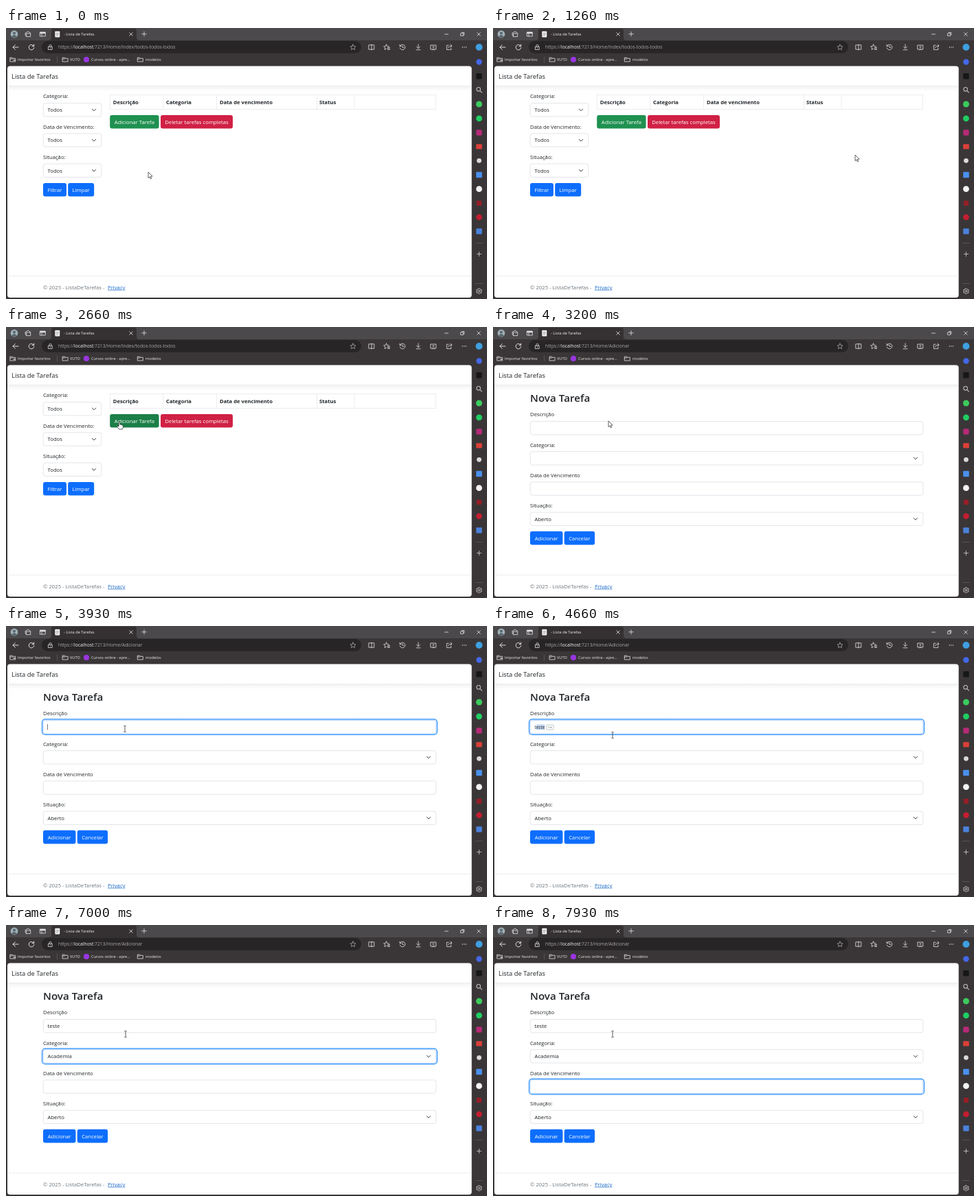
Write an HTML page that moves like this. It is 700x395 px and loops after 8000 ms.

```html
<!DOCTYPE html>
<html lang="pt">
<head>
<meta charset="utf-8">
<title>Lista de Tarefas</title>
<style>
  html, body { margin: 0; width: 100%; height: 100%; overflow: hidden; background: #3a3638; }
  svg { display: block; width: 100vw; height: 100vh; }
  text { font-family: "Open Sans", "Noto Sans", sans-serif; white-space: pre; }
</style>
</head>
<body>
<svg id="stage" viewBox="0 0 700 395" preserveAspectRatio="none">
  <defs>
    <linearGradient id="shade" x1="0" y1="0" x2="0" y2="1">
      <stop offset="0" stop-color="#000" stop-opacity=".055"/>
      <stop offset="1" stop-color="#000" stop-opacity="0"/>
    </linearGradient>
  </defs>
  <g id="chrome"></g>
  <text y="30.4" font-size="6.75" fill="#a9a6a8"><tspan x="76">https://</tspan><tspan fill="#f2f2f2">localhost</tspan><tspan id="path"></tspan></text>
  <g id="frame"></g>
  <g id="list"></g>
  <g id="form"></g>
  <g id="cursor"></g>
</svg>
<script>
const LOOP = 8000, OPEN_FORM = 2950;
const BODY = 7.72, INK = '#212529', LINE = '#dee2e6', BLUE = '#0d6efd';
const $ = id => document.getElementById(id);

const text = (x, y, s, size = BODY, fill = INK, more = '') =>
  `<text x="${x}" y="${y}" font-size="${size}" fill="${fill}" ${more}>${s}</text>`;
const rect = (x, y, w, h, fill, rx = 0, more = '') =>
  `<rect x="${x}" y="${y}" width="${w}" height="${h}" rx="${rx}" fill="${fill}" ${more}/>`;
const dot = (x, y, r, fill) => `<circle cx="${x}" cy="${y}" r="${r}" fill="${fill}"/>`;
const icon = (x, y, d, color = '#e6e4e5', w = .8) =>
  `<path transform="translate(${x} ${y})" d="${d}" fill="none" stroke="${color}" stroke-width="${w}" stroke-linecap="round" stroke-linejoin="round"/>`;
const button = (x, y, w, label, fill, id = '') =>
  rect(x, y, w, 19.6, fill, 3, id && `id="${id}"`) +
  text(x + w / 2, y + 12.7, label, BODY, '#fff', 'text-anchor="middle"');
const chevron = (x, y) => icon(x, y, 'M-2.6-1.3L0 1.3L2.6-1.3', '#343a40', 1);

const CROSS = 'M-2.3-2.3L2.3 2.3M2.3-2.3L-2.3 2.3';
const PLUS = 'M-3.2 0H3.2M0-3.2V3.2';
const FOLDER = 'M-3.8-2.8H-1L0-1.7H3.8V3H-3.8ZM-3.8-.9H-1L0-1.7';
const STAR = 'M0-4L1.2-1.4L4-1.1L1.9.8L2.5 3.6L0 2.2L-2.5 3.6L-1.9.8L-4-1.1L-1.2-1.4Z';
const BOX = 'M-3.8-3H3.8V3H-3.8Z';

function drawChrome() {
  const strip = rect(0, 0, 700, 18, '#4b494b') +
    '<path d="M62 18Q66 18 66 14V4Q66 1 69 1H187Q190 1 190 4V14Q190 18 194 18Z" fill="#353133"/>' +
    dot(12, 9, 5.4, '#9fb0b8') + dot(12, 7.4, 2, '#59666c') +
    '<path d="M8.2 12.6Q12 7.6 15.8 12.6Q12 16 8.2 12.6" fill="#59666c"/>' +
    icon(32, 9, 'M-3.8-1.5L0-4L3.8-1.5M-2-1H3.7V3.6H-2ZM-3.8-1.5V2L-2 3.4') +
    icon(53.5, 9, BOX + 'M-3.8-1.2H3.8M-1.5-1.2V3') + rect(49.7, 6, 7.6, 1.8, '#e6e4e5') +
    rect(71.3, 4.8, 7, 8.6, '#f4f4f4', .8) + icon(74.8, 9.2, 'M-1.8-1.8H1.8M-1.8 0H1.8M-1.8 1.8H1', '#77777a', .6) +
    text(84, 11.1, '- Lista de Tarefas', 5.72, '#f1f1f1') +
    icon(182, 9, CROSS) + icon(201, 8.7, PLUS) +
    icon(641, 9, 'M-2.5 0H2.5') + icon(664.3, 9, 'M-2.3-1.2H1.3V2.4H-2.3ZM-1-2.4H2.5V1.2') + icon(688, 9, CROSS);

  const toolbar = rect(52, 18.8, 465, 18, '#282527', 9) +
    icon(14, 28, 'M4 0H-4M-.6-3.4L-4 0L-.6 3.4', '#f0f0f0', .9) +
    icon(37, 28, 'M3.4-1.6A3.8 3.8 0 1 0 3.8.6M3.7-4V-1.4H1.1', '#f0f0f0', .9) +
    icon(64.5, 28.2, 'M-2.7-.9H2.7V3.3H-2.7ZM-1.5-.9V-2.3A1.5 1.5 0 0 1 1.5-2.3V-.9M0 .9V1.3') +
    icon(505, 28, STAR, '#b9b6b8', .7) +
    icon(532, 28, 'M-3.8-3.2H3.8V3.2H-3.8ZM0-4V4') +
    icon(554, 28, 'M-.5-4L.6-1.4L3.4-1.1M-.5-4L-1.6-1.4L-4.4-1.1L-2.3.8L-2.9 3.6L-.8 2.4M1.6.6H4.4M.8 2H4.4M1.6 3.4H4.4') +
    icon(577, 28, 'M-3.6-1.6A3.9 3.9 0 1 1-3.8 1M-4-3.8V-1.5H-1.7M0-2V.4H1.9') +
    icon(600, 28, 'M0-4.2V1.6M-2.5-.8L0 1.7L2.5-.8M-3 3.8H3') +
    icon(622, 28, BOX + 'M-1.6 4.2L0 2.4L1.6 4.2M-1-1.4L1 .6M1-1.4L-1 .6') +
    icon(645, 28, 'M-.8-2.8H-3.6V3.6H2.8V1.2M-1.4.9Q-.8-2 3.8-2M2-4L4-2L2 0') +
    [-2.6, 0, 2.6].map(d => dot(667 + d, 28, .65, '#eee')).join('') +
    dot(688.5, 28, 5, '#3f9fe0');

  const bookmarks =
    icon(10, 46, FOLDER + 'M.5 1H3M2 .1L3 1L2 1.9') + text(17, 48.2, 'Importar favoritos', 5.6, '#ececec') +
    rect(74, 41.5, .6, 9, '#6a6668') +
    icon(86.3, 46, FOLDER) + text(93, 48.2, 'VUTO', 5.6, '#ececec') +
    dot(117, 46, 4.1, '#9a35e0') + text(124, 48.2, 'Cursos online - apre...', 5.6, '#ececec') +
    icon(195.5, 46, FOLDER) + text(203, 48.2, 'modelos', 5.6, '#ececec');

  const X = 688.5;
  const sidebar =
    dot(X, 49.5, 4.2, '#4468e8') + rect(X - 4.2, 66, 8.4, 8.4, '#171717', 1) +
    icon(X, 90.3, 'M1.4 1.2L4 3.8M2-1A2.8 2.8 0 1 1-3.6-1A2.8 2.8 0 1 1 2-1', '#bcb9bd', 1.1) +
    dot(X, 111, 4.5, '#3ccb5c') + dot(X, 131.8, 4.4, '#1fcf62') +
    rect(X - 4.2, 148.3, 8.4, 8.4, '#b52a76', 2) + rect(X - 4.3, 169.2, 8.6, 7.2, '#dc4038', 1) +
    dot(X, 193.3, 3.4, '#d9d9d9') + rect(X - 4.3, 209.7, 8.6, 8.6, '#4a90ee', 1) +
    dot(X, 234.7, 4.4, '#f3f3f3') + rect(X - 3.6, 251.8, 7.2, 7.2, '#951f26', 1) +
    dot(X, 275.7, 4.3, '#c51d30') + rect(X - 4.2, 292.2, 8.4, 8.4, '#4a82dc', 1) +
    rect(683, 313, 11, .6, '#686466') + icon(X, 329.5, PLUS, '#d0ced0') +
    rect(683, 372, 11, .6, '#686466') +
    icon(X, 383.6, 'M0-4.2L1.3-2.9L3.6-2.1L3.3 0L3.6 2.1L1.3 2.9L0 4.2L-1.3 2.9L-3.6 2.1L-3.3 0L-3.6-2.1L-1.3-2.9Z') +
    icon(X, 383.6, 'M1.3 0A1.3 1.3 0 1 1-1.3 0A1.3 1.3 0 1 1 1.3 0');

  $('chrome').innerHTML = rect(0, 0, 700, 395, '#3a3638') + strip + toolbar + bookmarks + sidebar;
}

function drawFrame() {
  $('frame').innerHTML = rect(2, 55.5, 675.7, 337.5, '#fff', 4) +
    rect(2, 84.2, 675.7, 8, 'url(#shade)') + rect(2, 84, 675.7, .5, LINE) +
    text(8, 74, 'Lista de Tarefas', 9.45) +
    rect(2, 361.4, 675.7, .6, LINE) +
    text(54, 380.6, '© 2025 - ListaDeTarefas -', BODY, '#6c757d') +
    text(148, 380.6, 'Privacy', BODY, '#1768c9', 'text-decoration="underline"');
}

function drawList() {
  const filters = ['Categoria:', 'Data de Vencimento:', 'Situação:'].map((label, i) => {
    const y = 109.4 + 44.2 * i;
    return text(54, y - 7, label) +
      rect(54.2, y + .2, 84.6, 19.4, '#fff', 3, 'stroke="#ced4da" stroke-width=".6"') +
      text(60.5, y + 12.8, 'Todos') + chevron(128, y + 10);
  }).join('');
  const lines = [151.3, 228.5, 306.5, 452.5, 507, 625.7].map(x => rect(x - .3, 97.2, .6, 21.6, LINE)).join('');
  const heads = [[155.8, 'Descrição'], [233, 'Categoria'], [311, 'Data de vencimento'], [456, 'Status']]
    .map(([x, s]) => text(x, 111, s, 7.67, INK, 'font-weight="700"')).join('');
  $('list').innerHTML = filters +
    button(54, 225.9, 34, 'Filtrar', BLUE) + button(90.2, 225.9, 38, 'Limpar', BLUE) +
    lines + rect(151, 97, 475, .6, LINE) + rect(151, 118.4, 475, .6, LINE) + heads +
    button(151.2, 127, 71.4, 'Adicionar Tarefa', '#1f9150', 'add') +
    button(225, 127, 105, 'Deletar tarefas completas', '#d02145');
}

const fieldY = i => 137.3 + 44.2 * i;

function drawForm() {
  const fields = ['Descrição', 'Categoria:', 'Data de Vencimento', 'Situação:'].map((label, i) => {
    const y = fieldY(i);
    return text(54, y - 7, label) +
      `<rect id="ring${i}" fill="#258cfb"/><rect id="gap${i}" fill="#fff"/>` +
      rect(54.2, y + .2, 571.6, 19.4, '#fff', 3, `id="box${i}" stroke-width=".6"`) +
      text(60.5, y + 12.8, i == 3 ? 'Aberto' : '', BODY, INK, `id="value${i}"`) +
      (i % 2 ? chevron(615, y + 10) : '');
  }).join('');
  const hint = rect(63, 143.4, 12.4, 8, '#c5d9f2') + text(60.5, 149.8, 'teste', 6.4) +
    rect(77.7, 144.2, 10.4, 7, '#fff', 1.2, 'stroke="#8b8f94" stroke-width=".5"') +
    text(82.9, 149.3, 'Tab', 4.1, '#777b80', 'text-anchor="middle"');
  $('form').innerHTML = text(54, 109.4, 'Nova Tarefa', 15.2, INK, 'font-weight="600"') + fields +
    `<g id="hint">${hint}</g>` + rect(0, 0, .6, 8.4, '#222', 0, 'id="caret"') +
    button(54, 297.8, 47.5, 'Adicionar', BLUE) + button(103.7, 297.8, 44.4, 'Cancelar', BLUE);
}

const SHAPES = {
  arrow: '<path d="M0 0V8.6L2 6.8L3.4 9.9L4.7 9.3L3.4 6.3L6.1 6.1Z" fill="#fff" stroke="#222" stroke-width=".7" stroke-linejoin="round"/>',
  hand: '<path d="M-.9.8Q0-.6.9.8V4.2Q2 3.6 2.6 4.6Q3.8 4.2 4.2 5.2Q5.4 5 5.5 6.2Q5.6 9 4.2 11H-.4Q-2-.0 9 -3.6 7Q-3.2 5.4-.9 7Z" fill="#fff"/>',
  beam: '<path d="M-1.7-4.4H-.5L0-4L.5-4.4H1.7M0-4V4M-1.7 4.4H-.5L0 4L.5 4.4H1.7" fill="none" stroke="#333" stroke-width=".8"/>'
};
SHAPES.hand = '<path d="M-.9.8Q0-.6.9.8V4.2Q2 3.6 2.6 4.6Q3.8 4.2 4.2 5.2Q5.4 5 5.5 6.2Q5.6 9 4.2 11H-.4Q-2 9-3.6 7Q-3.2 5.4-.9 7Z" fill="#fff" stroke="#222" stroke-width=".7" stroke-linejoin="round"/>';

const clamp = v => Math.max(0, Math.min(1, v));
const ease = v => { v = clamp(v); return v * v * (3 - 2 * v); };

// time, x, y
const TRACK = [[0, 207, 210], [150, 207, 210], [1050, 527, 185], [1500, 527, 185], [2400, 165, 138],
  [2900, 165, 138], [3150, 168, 137], [3300, 168, 137], [3600, 173, 150], [3950, 173, 150], [4300, 174, 159], [LOOP, 174, 159]];

function cursorAt(t) {
  const i = TRACK.findIndex(p => p[0] > t);
  const [t0, x0, y0] = TRACK[i - 1], [t1, x1, y1] = TRACK[i];
  const k = ease((t - t0) / (t1 - t0));
  return [x0 + (x1 - x0) * k, y0 + (y1 - y0) * k];
}

// focus start and end of the first three fields
const FOCUS = [[3750, 5790], [5790, 7430], [7430, 9e3]];

function outset(el, y, d, alpha) {
  const a = { x: 54 - d, y: y - d, width: 572 + 2 * d, height: 19.7 + 2 * d, rx: 3 + d, opacity: alpha };
  for (const k in a) el.setAttribute(k, a[k]);
}

function setFocus(i, k) {
  const mix = (a, b) => Math.round(a + (b - a) * k);
  outset($('ring' + i), fieldY(i), 2.05 * k, k);
  outset($('gap' + i), fieldY(i), .82 * k, k);
  $('box' + i).setAttribute('stroke', `rgb(${mix(206, 134)},${mix(212, 183)},${mix(218, 254)})`);
}

const show = (id, on) => $(id).setAttribute('display', on ? 'inline' : 'none');

function render(t) {
  const form = t >= OPEN_FORM;
  show('list', !form);
  show('form', form);
  $('path').textContent = ':7213/Home/' + (form ? 'Adicionar' : 'Index/todos-todos-todos');

  const [x, y] = cursorAt(t);
  const overAdd = !form && x > 151 && x < 222.5 && y > 127 && y < 146.6;
  $('add').setAttribute('fill', overAdd ? '#1b7f47' : '#1f9150');
  $('cursor').innerHTML = SHAPES[overAdd ? 'hand' : t > 3400 ? 'beam' : 'arrow'];
  $('cursor').setAttribute('transform', `translate(${x} ${y})`);

  FOCUS.forEach(([on, off], i) => setFocus(i, ease((t - on) / 150) - ease((t - off) / 150)));
  setFocus(3, 0);
  const accepted = t >= 5100;
  show('hint', t >= 4450 && !accepted);
  $('value0').textContent = accepted ? 'teste' : '';
  $('value1').textContent = t >= 6700 ? 'Academia' : '';

  const field = FOCUS.findIndex(([on, off]) => t >= on && t < off);
  const typing = t >= 4450 && !accepted;
  const lit = field >= 0 && field != 1 && !typing && (t - FOCUS[field][0]) % 1000 < 500;
  show('caret', lit);
  if (lit) {
    $('caret').setAttribute('x', field == 0 && accepted ? 78.6 : 60.4);
    $('caret').setAttribute('y', fieldY(field) + 5.7);
  }
}

drawChrome();
drawFrame();
drawList();
drawForm();
const begin = performance.now();
function tick() {
  render((performance.now() - begin) % LOOP);
  requestAnimationFrame(tick);
}
render(0);
requestAnimationFrame(tick);
</script>
</body>
</html>
```
